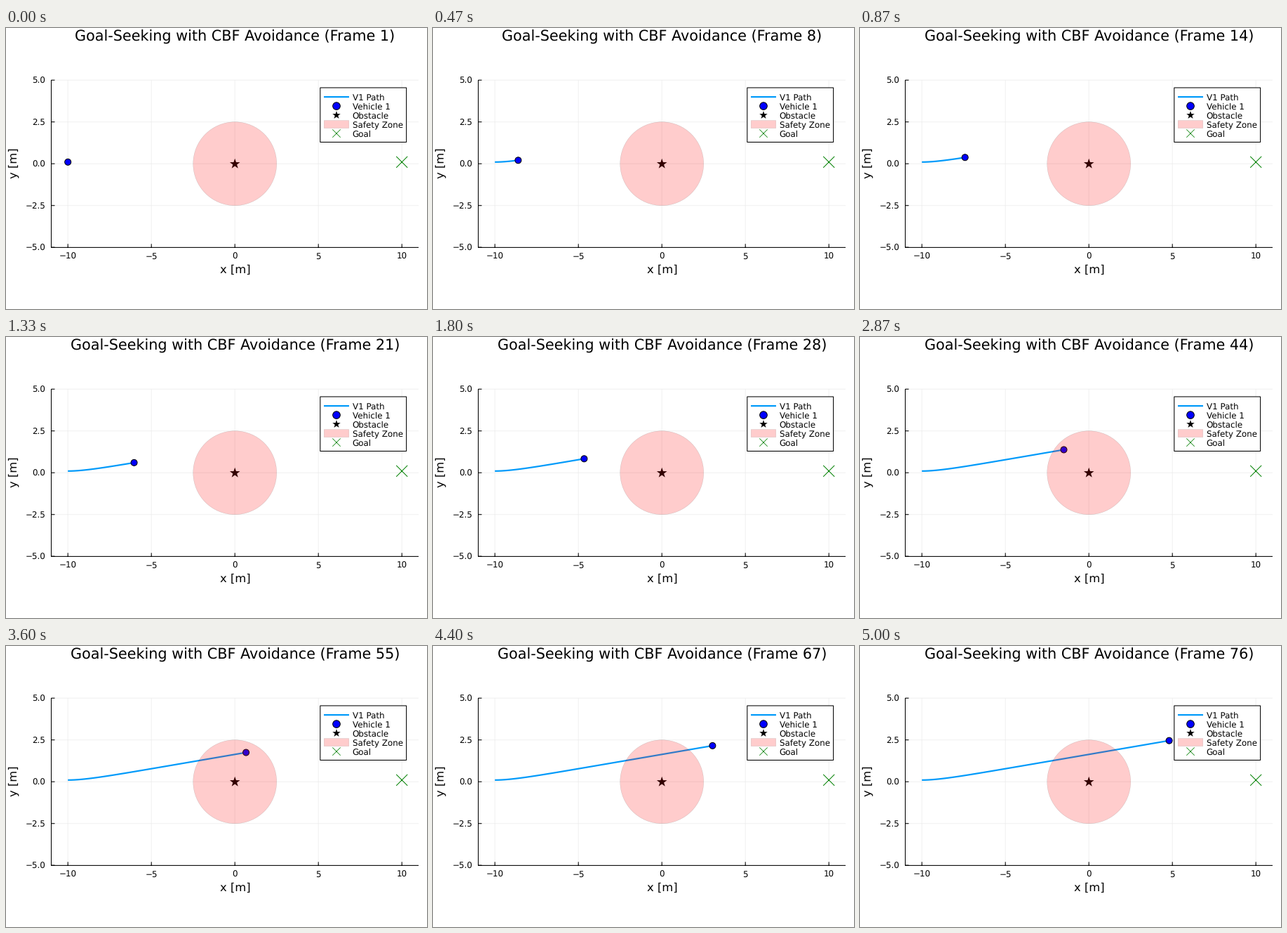
A matplotlib script for the animation above (5.07 s loop, 600 by 400 pixels).

```python
import numpy as np
import matplotlib.pyplot as plt
from matplotlib.animation import FuncAnimation
from matplotlib.patches import Circle, Polygon, Rectangle

W, H, DPI = 600, 400, 100
PT = 72 / DPI                      # points per pixel
LOOP, TICK = 5070, 10              # ms
STEPS, STEP_MS = 76, 200 / 3
UNIT, X0, Y0 = 23.8, 326.2, 193.2  # metres to pixels
LEFT, RIGHT, TOP, BOTTOM = 64.5, 588, 74.2, 312.4

plt.rcParams.update({
    "font.family": "DejaVu Sans",
    "text.hinting": "none",
    "path.snap": False,
})

fig = plt.figure(figsize=(W / DPI, H / DPI), dpi=DPI, facecolor="white")
ax = fig.add_axes([0, 0, 1, 1])
ax.set_xlim(0, W)
ax.set_ylim(H, 0)
ax.axis("off")


def px(x):
    return X0 + UNIT * x


def py(y):
    return Y0 - UNIT * y


def segments(segs, color, width, z, **kw):
    """Draw separate straight strokes (x1, y1, x2, y2) as one line."""
    xs, ys = [], []
    for x1, y1, x2, y2 in segs:
        xs += [x1, x2, np.nan]
        ys += [y1, y2, np.nan]
    ax.plot(xs, ys, color=color, lw=width * PT, zorder=z,
            solid_capstyle="butt", **kw)


def label(x, y, s, size, ha="center", **kw):
    return ax.text(x, y, s.replace("−", "\u2212"), fontsize=size * PT, ha=ha,
                   va="baseline", zorder=9, **kw)


def number(v, fmt):
    return format(v, fmt).replace("-", "\u2212")


def dot(x, y, r, z):
    return ax.add_patch(Circle((x, y), r, fc="blue", ec="black",
                               lw=PT, zorder=z))


def star(x, y, r, z):
    a = np.arange(10) * np.pi / 5
    rad = np.where(np.arange(10) % 2, 0.39 * r, r)
    pts = np.column_stack([x + rad * np.sin(a), y - rad * np.cos(a)])
    ax.add_patch(Polygon(pts, fc="black", ec="none", zorder=z))


def cross(x, y, r, width, z):
    segments([(x - r, y - r, x + r, y + r), (x - r, y + r, x + r, y - r)],
             "green", width, z)


def zone(shape):
    shape.set(fc=(1, 0, 0, 0.2), ec=(0, 0, 0, 0.2), lw=0.4 * PT)
    ax.add_patch(shape)


def drive():
    """Constant speed, heading settling on a fixed climb angle."""
    n = np.arange(STEPS - 1)
    heading = 0.17 * (1 - np.exp(-(n + 0.5) / 5.3))
    x = -10 + np.r_[0, np.cumsum(0.2 * np.cos(heading))]
    y = 0.1 + np.r_[0, np.cumsum(0.2 * np.sin(heading))]
    return px(x), py(y)


# Grid, axes and ticks
xticks = [-10, -5, 0, 5, 10]
yticks = [-5, -2.5, 0, 2.5, 5]
segments([(px(v), TOP, px(v), BOTTOM) for v in xticks]
         + [(LEFT, py(v), RIGHT, py(v)) for v in yticks],
         "black", 1, 1, alpha=0.06)
segments([(LEFT, TOP, LEFT, BOTTOM + 0.5), (LEFT, BOTTOM, RIGHT, BOTTOM)]
         + [(px(v), BOTTOM, px(v), BOTTOM - 5) for v in xticks]
         + [(LEFT, py(v), LEFT + 5, py(v)) for v in yticks],
         "black", 1.05, 2)
for v in xticks:
    label(px(v), 329, number(v, "d"), 11.9)
for v in yticks:
    label(56.3, py(v) + 4.8, number(v, ".1f"), 11.9, ha="right")
label(X0 + 0.4, 348.5, "x [m]", 16.35)
label(16, Y0 - 0.6, "y [m]", 16.35, rotation=90, rotation_mode="anchor")
title = label(X0 + 0.4, 19, "", 20.8)

# Scene
path_x, path_y = drive()
path, = ax.plot([], [], color="#009AFA", lw=2.2 * PT, zorder=3,
                solid_capstyle="butt")
car = dot(path_x[0], path_y[0], 4.5, 4)
star(X0, Y0 + 0.3, 7.7, 4)
zone(Circle((X0, Y0), 2.5 * UNIT, zorder=5))
cross(px(10), py(0.1), 8, 1, 6)

# Legend
ax.add_patch(Rectangle((447.8, 85), 122.8, 77.5, fc="white", ec="black",
                       lw=1.05 * PT, zorder=7))
rows = 98.1 + 13 * np.arange(5)
names = ["V1 Path", "Vehicle 1", "Obstacle", "Safety Zone", "Goal"]
for y, name in zip(rows, names):
    label(493.6, y + 4.4, name, 11.9, ha="left")
segments([(453, rows[0], 489, rows[0])], "#009AFA", 2.2, 8)
dot(471, rows[1], 5.3, 8)
star(471, rows[2], 6, 8)
zone(Rectangle((453.3, rows[3] - 5.5), 35.4, 11, zorder=8))
cross(471, rows[4], 5.7, 0.75, 8)


def update(i):
    # Step times fall on whole ticks
    k = min(int((i * TICK + 5) / STEP_MS), STEPS - 1)
    path.set_data(path_x[:k + 1], path_y[:k + 1])
    car.center = path_x[k], path_y[k]
    title.set_text(f"Goal-Seeking with CBF Avoidance (Frame {k + 1})")
    return path, car, title


anim = FuncAnimation(fig, update, frames=LOOP // TICK, interval=TICK,
                     repeat=True, repeat_delay=0, blit=False)
plt.show()
```
